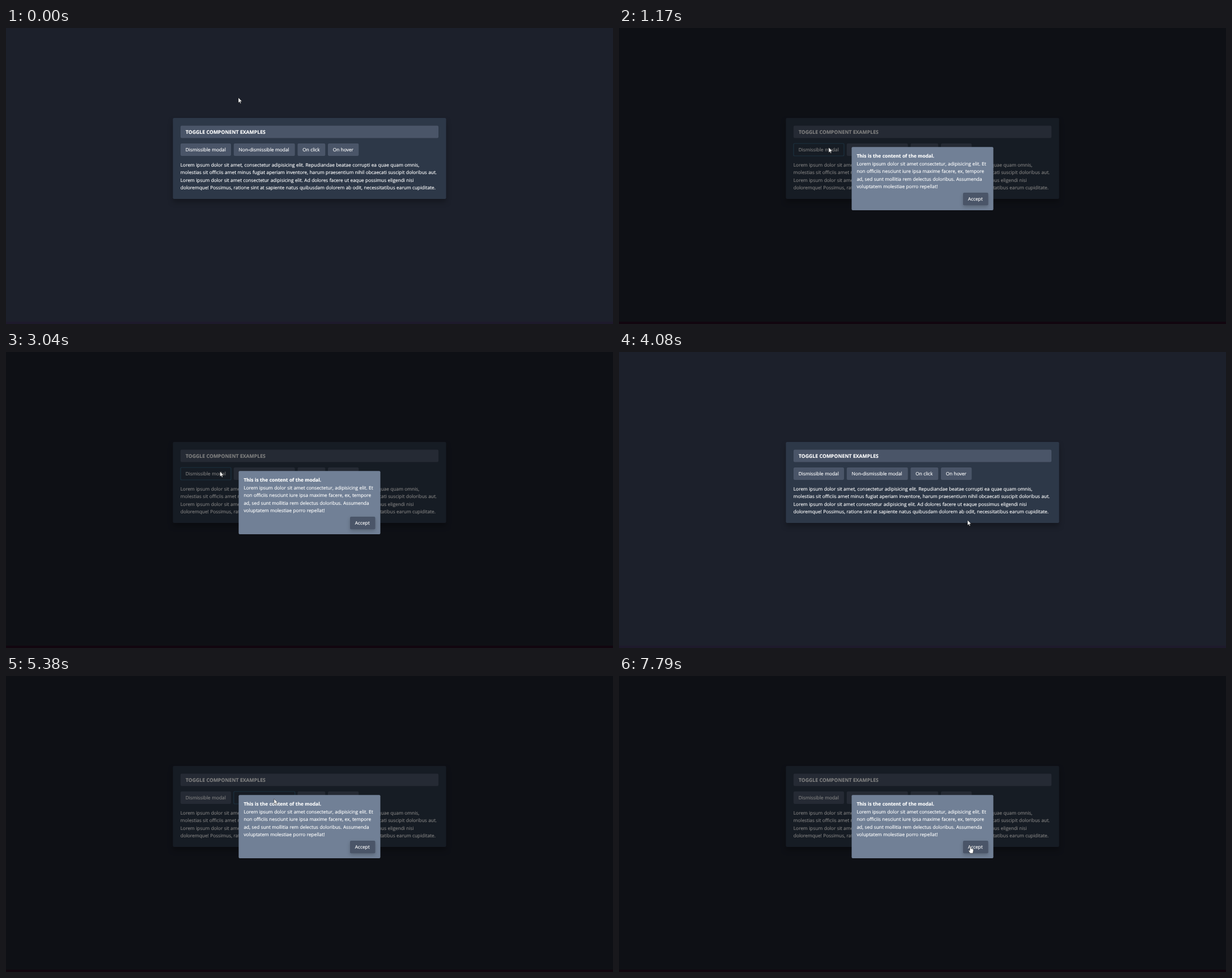
These frames come from a looping animation (1071 px wide and 523 px high, 8000 ms). An HTML page:

```html
<!DOCTYPE html>
<html lang="en">
<head>
<meta charset="utf-8">
<title>Toggle component examples</title>
<style>
  html, body { margin: 0; width: 100%; height: 100%; overflow: hidden; background: #1c202b; }
  svg { display: block; width: 1071px; height: 523px; }
  text {
    font: 8.34px "Open Sans", "Noto Sans", sans-serif; word-spacing: .23px;
    fill: #fff; stroke: #fff; stroke-width: .16; text-rendering: geometricPrecision;
  }
  .bold { font-weight: 700; font-size: 8.42px; }
  .title { font-size: 8.7px; }
  .box { fill: #4a5568; filter: drop-shadow(0 .6px .7px #0003); }
  .focus .box { fill: #2d3848; stroke: #3a6482; stroke-width: 1.2; }
  .card { filter: drop-shadow(0 6px 5px #0004); }
  .accept { filter: drop-shadow(0 3px 3px #0003); }
  #cursor path { fill: #fff; stroke: #111; stroke-width: .5; }
</style>
</head>
<body>
<svg viewBox="0 0 1071 523">
  <rect width="1071" height="523" fill="#1c202b"/>
  <rect class="card" x="294.5" y="159" width="482" height="143" rx="2" fill="#2d3848"/>
  <rect class="box" x="308" y="172.5" width="455" height="22" rx="2"/>
  <text class="bold title" x="317" y="187">TOGGLE COMPONENT EXAMPLES</text>
  <g id="buttons"></g>
  <g id="intro"></g>
  <rect y="519" width="1071" height="4" fill="#1e1a2c"/>
  <g id="modal">
    <rect width="1071" height="523" opacity=".5"/>
    <rect y="519" width="1071" height="4" fill="#12060f"/>
    <rect x="410.5" y="210.3" width="250" height="111.7" rx="2" fill="#718096"/>
    <text class="bold" x="419.4" y="229.4">This is the content of the modal.</text>
    <g id="content"></g>
    <rect class="box accept" x="607" y="291" width="44.5" height="22.3" rx="2"/>
    <text x="615.7" y="305.3">Accept</text>
  </g>
  <g id="cursor">
    <path id="arrow" d="M0 0V9.3L2.1 7.3 3.5 10.4 4.8 9.8 3.5 6.8H6.4Z"/>
    <path id="hand" d="M-1 1Q0-.6 1 1V4.4L4.5 5.2Q5.6 5.6 5.4 7L4.6 12.7H-.6L-3.2 8.5Q-3.2 6.8-1.8 7.4L-1 8.2Z"/>
  </g>
</svg>
<script>
const $ = id => document.getElementById(id);
const LINE = 13.4;
const lines = (id, x, y, rows) => {
  $(id).innerHTML = rows.map((row, i) => `<text x="${x}" y="${y + i * LINE}">${row}</text>`).join('');
};

lines('intro', 307.8, 245, [
  'Lorem ipsum dolor sit amet, consectetur adipisicing elit. Repudiandae beatae corrupti ea quae quam omnis,',
  'molestias sit officiis amet minus fugiat aperiam inventore, harum praesentium nihil obcaecati suscipit doloribus aut.',
  'Lorem ipsum dolor sit amet consectetur adipisicing elit. Ad dolores facere ut eaque possimus eligendi nisi',
  'doloremque! Possimus, ratione sint at sapiente natus quibusdam dolorem ab odit, necessitatibus earum cupiditate.'
]);
lines('content', 419.4, 242.9, [
  'Lorem ipsum dolor sit amet consectetur, adipisicing elit. Et',
  'non officiis nesciunt iure ipsa maxime facere, ex, tempore',
  'ad, sed sunt mollitia rem delectus doloribus. Assumenda',
  'voluptatem molestiae porro repellat!'
]);

// label, left, width, spans of time with focus
const buttons = [
  ['Dismissible modal', 308, 89, [[920, 2330], [2860, 3960]]],
  ['Non-dismissible modal', 401.8, 108, [[5250, 5920]]],
  ['On click', 514.4, 49, []],
  ['On hover', 568, 54.4, []]
];
$('buttons').innerHTML = buttons.map(([label, x, w]) =>
  `<g><rect class="box" x="${x}" y="204" width="${w}" height="22" rx="2"/><text x="${x + 8.8}" y="218.3">${label}</text></g>`
).join('');

const openSpans = [[1170, 2330], [3040, 3960], [5340, 8000]];

// cursor moves: start, end, x, y
const moves = [
  [0, 0, 410, 123],
  [290, 1040, 370, 211],
  [1710, 2080, 441, 114.5],
  [2420, 2950, 377.6, 211],
  [3210, 3750, 615, 297],
  [4580, 5080, 473, 217],
  [5420, 5840, 466, 146],
  [6250, 6630, 491, 135],
  [6790, 6830, 493, 134],
  [7210, 7790, 620, 300.5]
];

const within = (spans, t) => spans.some(([a, b]) => t >= a && t < b);
const ease = p => p * p * (3 - 2 * p);

function cursorAt(t) {
  let [, , x, y] = moves[0];
  for (const [from, to, toX, toY] of moves.slice(1)) {
    if (t <= from) break;
    const p = ease(Math.min(1, (t - from) / (to - from)));
    x += (toX - x) * p;
    y += (toY - y) * p;
  }
  return [x, y];
}

const inside = (x, y, left, top, w, h) => x >= left && x <= left + w && y >= top && y <= top + h;
const show = (id, on) => $(id).setAttribute('display', on ? 'inline' : 'none');

function draw() {
  const t = performance.now() % 8000;
  const open = within(openSpans, t);
  const [x, y] = cursorAt(t);
  const pointing = open
    ? inside(x, y, 607, 291, 44.5, 22.3)
    : buttons.some(([, left, w]) => inside(x, y, left, 204, w, 22));

  show('modal', open);
  show('hand', pointing);
  show('arrow', !pointing);
  $('cursor').setAttribute('transform', `translate(${x} ${y})`);
  buttons.forEach(([, , , spans], i) => $('buttons').children[i].classList.toggle('focus', within(spans, t)));
  requestAnimationFrame(draw);
}
draw();
</script>
</body>
</html>
```
